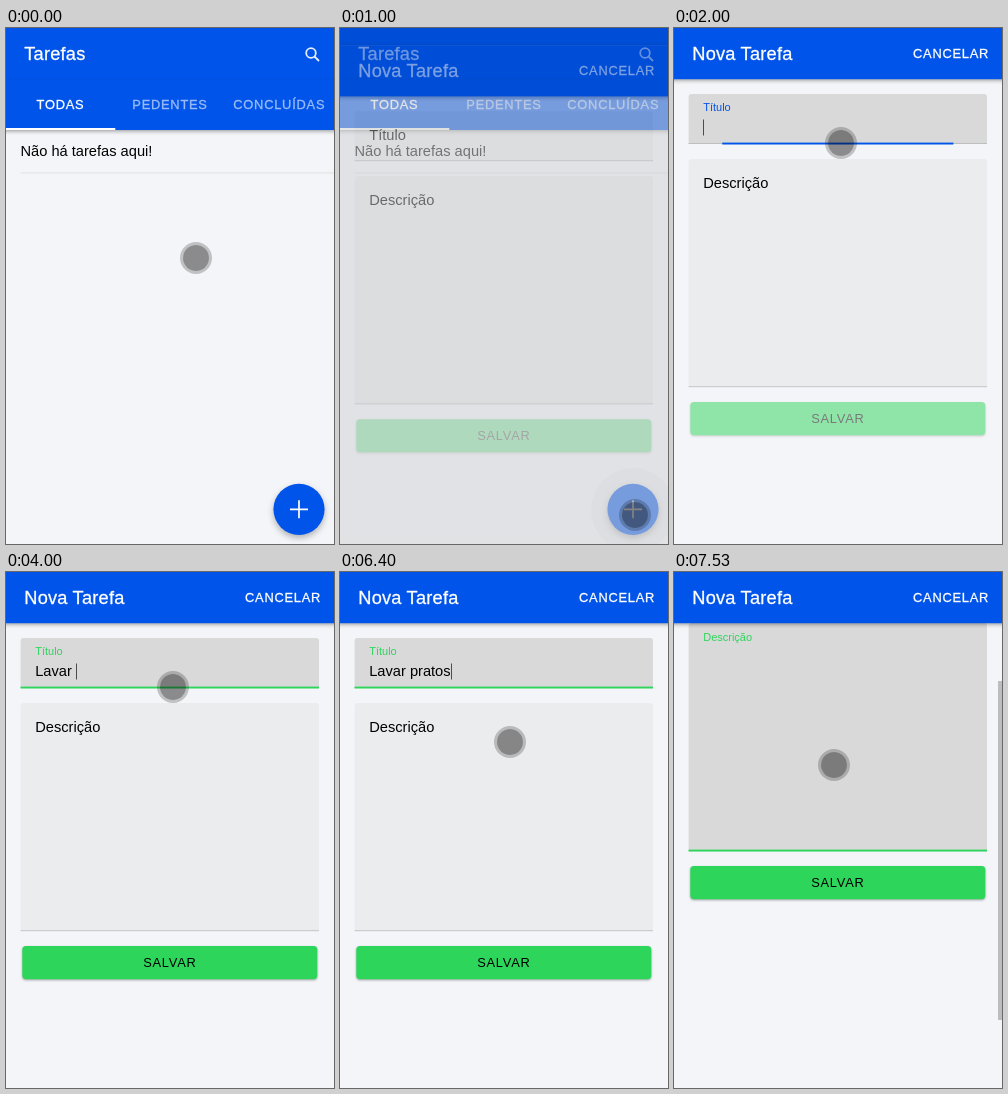
These frames come from a looping animation (328x516 px, 8000 ms). An HTML page:

```html
<!DOCTYPE html>
<html lang="pt">
<head>
<meta charset="utf-8">
<title>Tarefas</title>
<style>
  html, body { margin: 0; width: 100%; height: 100%; overflow: hidden; background: #f4f5f8; }
  svg { display: block; width: 100vw; height: 100vh; }
  text { font-family: "Liberation Sans", Arial, sans-serif; font-size: 14.65px; white-space: pre; }
  .title { font-size: 18.2px; letter-spacing: .0125em; }
  .caps { font-size: 12.85px; letter-spacing: .06em; }
  .small { font-size: 11px; }
  .white { fill: #fff; stroke: #fff; stroke-width: .3px; }
  .dim { opacity: .6; }
  .head { filter: drop-shadow(0 1px 2px rgba(0, 0, 0, .4)); }
</style>
</head>
<body>
<svg viewBox="0 0 328 516">
  <defs>
    <clipPath id="body"><rect y="51" width="328" height="465"/></clipPath>
  </defs>

  <rect width="328" height="516" fill="#f4f5f8"/>
  <g id="list">
    <text x="14.5" y="128">Não há tarefas aqui!</text>
    <rect x="14.5" y="144.3" width="314" height="1.2" fill="#e3e4e6"/>
    <g class="head">
      <rect x="-5" y="-5" width="338" height="107" fill="#0054e9"/>
    </g>
    <rect y="50.6" width="328" height=".8" fill="#004fdb"/>
    <text class="title white" x="18.3" y="32">Tarefas</text>
    <g fill="none" stroke="#fff" stroke-width="1.8" opacity=".9">
      <circle cx="305" cy="25" r="4.8"/>
      <path d="M308.5 28.5L313 33"/>
    </g>
    <text class="caps white" x="30.5" y="81">TODAS</text>
    <text class="caps white dim" x="126.3" y="81">PEDENTES</text>
    <text class="caps white dim" x="227.3" y="81">CONCLUÍDAS</text>
    <rect y="100" width="109.3" height="2" fill="#fff"/>
    <circle id="ripple" cx="293" cy="482" r="42" fill="#000"/>
    <g style="filter: drop-shadow(0 3px 3px rgba(0, 0, 0, .28))">
      <circle cx="293" cy="481.3" r="25.6" fill="#0054e9"/>
    </g>
    <path d="M284 481.3h18M293 472.3v18" stroke="#fff" stroke-width="1.7"/>
  </g>

  <g id="form">
    <rect width="328" height="560" fill="#f4f5f8"/>
    <g clip-path="url(#body)">
      <g id="content">
        <path id="box1" d="M14.6 116V69a3 3 0 0 1 3-3H310a3 3 0 0 1 3 3V116z"/>
        <rect x="14.6" y="115" width="298.4" height="1" fill="#bdbec0"/>
        <rect id="line1" y="114.6" height="1.9"/>
        <text id="label1" x="29.2">Título</text>
        <text id="value" x="29.2" y="104"></text>
        <path id="box2" d="M14.6 359V134a3 3 0 0 1 3-3H310a3 3 0 0 1 3 3V359z"/>
        <rect x="14.6" y="358.2" width="298.4" height="1" fill="#c4c5c7"/>
        <rect id="line2" y="357.6" height="1.9" fill="#2dd55b"/>
        <text id="label2" x="29.2">Descrição</text>
        <rect id="caret" width="1" height="16"/>
        <g id="save">
          <rect x="16.3" y="374" width="295" height="33.2" rx="3.6" fill="#2dd55b"
            style="filter: drop-shadow(0 1.5px 1px rgba(0, 0, 0, .32))"/>
          <text class="caps" x="137.2" y="395">SALVAR</text>
        </g>
      </g>
    </g>
    <rect id="bar" x="324" width="4" height="339" fill="#bcbdbf"/>
    <g class="head">
      <rect x="-5" width="338" height="51.2" fill="#0054e9"/>
    </g>
    <text class="title white" x="18.3" y="32">Nova Tarefa</text>
    <text class="caps white" x="239" y="30">CANCELAR</text>
  </g>

  <rect id="shade" width="328" height="516"/>
  <g id="pointer">
    <circle r="14.5" fill="none" stroke="#000" stroke-width="3" opacity=".21"/>
    <circle r="13" opacity=".43"/>
  </g>
</svg>
<script>
const LOOP = 8000;
const OPEN = 945, FOCUS = 1930, VALID = 2870, NEXT = 7030;
const TEXT = "Lavar pratosds";
const KEYS = [2870, 3070, 3600, 3670, 3930, 4000, 4470, 4670, 4800, 5000, 5200, 5270, 6530, 6600];
// time, x, y
const PATH = [
  [200, 190, 230], [730, 295, 487], [1130, 295, 487], [1730, 167, 115],
  [6000, 167, 115], [6400, 170, 170], [6600, 181, 210], [6800, 160, 184], [6870, 160, 193]
];

const el = {};
document.querySelectorAll("[id]").forEach(n => el[n.id] = n);
const set = (id, attrs) => {
  for (const k in attrs) el[id].setAttribute(k, attrs[k]);
};

const clamp = x => Math.min(1, Math.max(0, x));
const part = (t, start, length) => clamp((t - start) / length);
const mix = (a, b, p) => a + (b - a) * p;
const smooth = x => x * x * (3 - 2 * x);
const color = (a, b, p) => `rgb(${a.map((v, i) => Math.round(mix(v, b[i], p)))})`;

function bezier(x1, y1, x2, y2) {
  const at = (a, b, u) => 3 * a * u * (1 - u) ** 2 + 3 * b * u * u * (1 - u) + u ** 3;
  return x => {
    let lo = 0, hi = 1;
    for (let i = 0; i < 24; i++) {
      const u = (lo + hi) / 2;
      if (at(x1, x2, u) < x) lo = u; else hi = u;
    }
    return at(y1, y2, (lo + hi) / 2);
  };
}
const ease = bezier(.25, .1, .25, 1);
const enter = bezier(.36, .66, .04, 1);

const BLUE = [0, 84, 233], GREEN = [45, 213, 91], BLACK = [0, 0, 0];
const IDLE = "#ebecee", ACTIVE = "#d9d9d9";

function place(t) {
  const i = PATH.findIndex(p => p[0] > t);
  if (i === 0) return PATH[0].slice(1);
  if (i < 0) return PATH[PATH.length - 1].slice(1);
  const a = PATH[i - 1], b = PATH[i];
  const p = smooth(part(t, a[0], b[0] - a[0]));
  return [mix(a[1], b[1], p), mix(a[2], b[2], p)];
}

function underline(id, p) {
  set(id, { x: 163.8 - 149.2 * p, width: 298.4 * p });
}

function label(id, p, from, to, fill) {
  el[id].style.fontSize = mix(14.65, 11, p) + "px";
  set(id, { y: mix(from, to, p), fill });
}

function drawCaret(t, typed) {
  const second = t >= NEXT + 70;
  const since = second ? NEXT : typed ? KEYS[typed - 1] : FOCUS;
  const on = t >= FOCUS && (t < NEXT || second) && (t - since) % 1000 < 500;
  const x = second ? 29.2 : 29.2 + (typed ? el.value.getSubStringLength(0, typed) : 0);
  set("caret", { x: Math.round(x), y: second ? 155 : 91.5, opacity: on ? .65 : 0 });
}

function draw(t) {
  const open = enter(part(t, OPEN, 280));
  const focus = ease(part(t, FOCUS, 150));
  const valid = smooth(part(t, VALID, 220));
  const next = ease(part(t, NEXT, 150));
  const scroll = 80 * smooth(part(t, 7000, 275));
  const typed = KEYS.filter(k => k <= t).length;

  set("form", {
    transform: `translate(0 ${36.6 * (1 - open)})`,
    opacity: open
  });
  set("shade", { opacity: .08 * Math.sin(Math.PI * open) });
  set("ripple", { opacity: t > 930 && open < 1 ? .03 : 0 });

  set("content", { transform: `translate(0 ${-scroll})` });
  set("bar", { y: 50.7 + scroll * .729, opacity: t >= NEXT ? 1 : 0 });

  const accent = color(BLUE, GREEN, valid);
  set("box1", { fill: t >= FOCUS && t < NEXT ? ACTIVE : IDLE });
  set("line1", { fill: accent });
  underline("line1", focus * (1 - next));
  label("label1", t >= FOCUS ? 1 : 0, 95.3, 83.3, t >= FOCUS ? accent : "#000");

  const text = TEXT.slice(0, typed);
  if (el.value.textContent !== text) el.value.textContent = text;

  const float = smooth(part(t, NEXT + 40, 150));
  set("box2", { fill: t >= NEXT ? ACTIVE : IDLE });
  underline("line2", next);
  label("label2", float, 160, 149.3, color(BLACK, GREEN, float));

  set("save", { opacity: mix(.5, 1, valid) });
  drawCaret(t, typed);
  set("pointer", { transform: `translate(${place(t)})` });
}

function tick() {
  draw(performance.now() % LOOP);
  requestAnimationFrame(tick);
}
tick();
</script>
</body>
</html>
```
